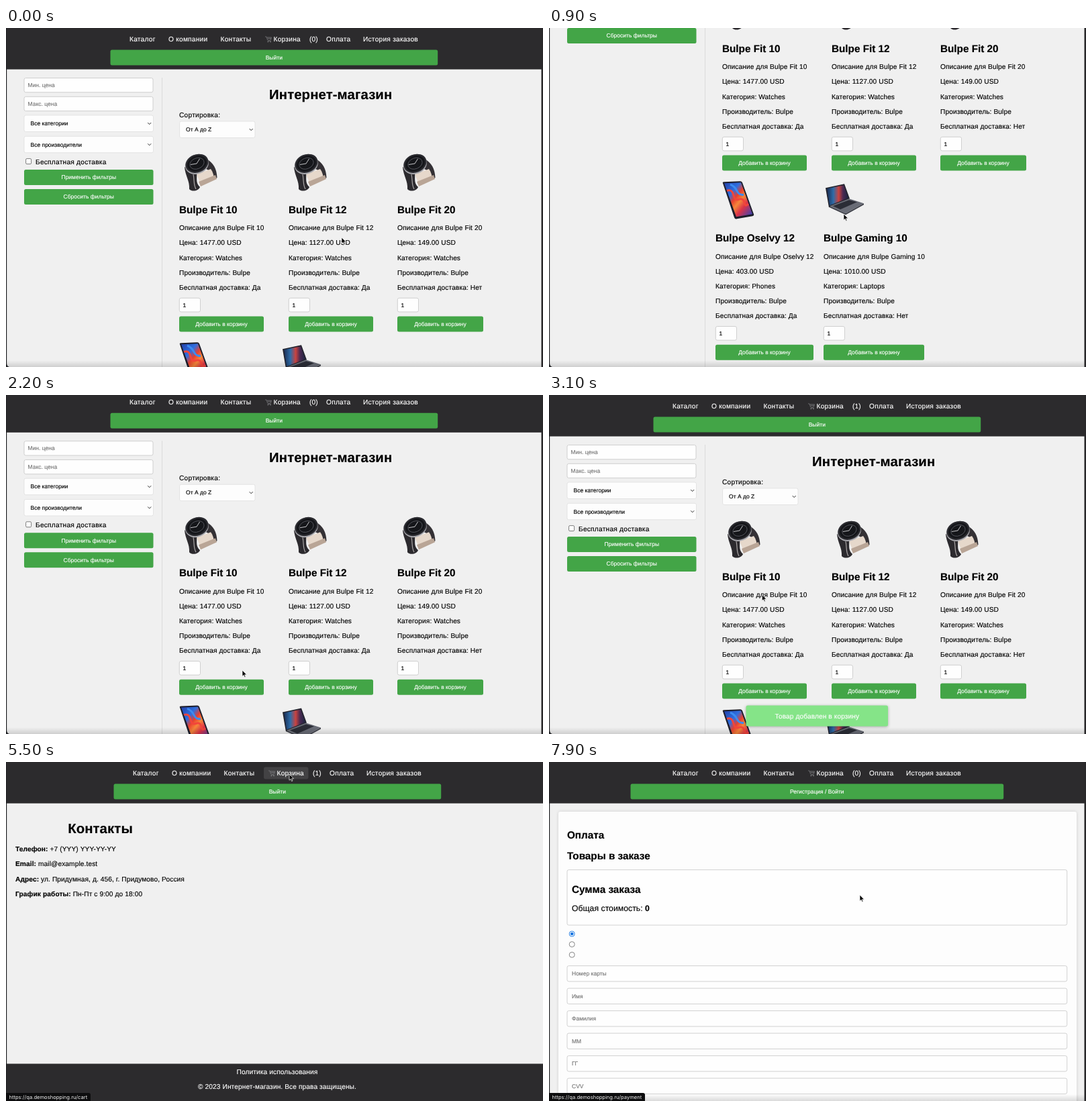
Write an HTML page that moves like this. It is 800 px wide and 505 px high and loops after 8 s.

```html
<!DOCTYPE html>
<html lang="ru">
<head>
<meta charset="utf-8">
<title>Интернет-магазин</title>
<style>
  html, body { margin: 0; width: 100%; height: 100%; overflow: hidden; background: #f0f0f0; }
  svg { display: block; width: 100vw; height: 100vh; }
  text {
    font: 10.17px "Liberation Sans", Arial, sans-serif; letter-spacing: .1px; white-space: pre;
    color: #000; fill: currentColor; stroke: currentColor; stroke-width: .15px;
    text-rendering: geometricPrecision;
  }
  .wide { letter-spacing: .24px; }
  .small { font-size: 8.48px; letter-spacing: .02px; }
  .large { font-size: 12.2px; letter-spacing: .04px; }
  .h1 { font-size: 20.35px; font-weight: bold; }
  .h2 { font-size: 15.27px; font-weight: bold; letter-spacing: 0; }
  .bold { font-weight: bold; }
  .mid { text-anchor: middle; }
  .white { color: #fff; }
  .hint { color: #757575; }
  .url { font: 7.6px Inter, Roboto, sans-serif; letter-spacing: 0; color: #f0f0f0; stroke: none; }
  .bar { fill: #2c2b2d; }
  .green { fill: #43a547; }
  .field { fill: #fefefe; stroke: #c6c6c6; stroke-width: .8; }
  .check { fill: #fff; stroke: #6f6f6f; stroke-width: .9; }
  .select { fill: #fdfdfd; stroke: #dcdcdc; stroke-width: .7; }
  .tick { fill: none; stroke: #333; stroke-width: 1; }
  #toast rect { fill: #85e488; filter: drop-shadow(0 1px 2px rgba(0, 0, 0, .3)); }
</style>
</head>
<body>
<svg id="stage" viewBox="0 0 800 505" preserveAspectRatio="none">
  <defs>
    <linearGradient id="screen" x1="0" y1="0" x2="1" y2="1">
      <stop offset="0" stop-color="#2340a8"/>
      <stop offset=".28" stop-color="#2f6fe0"/>
      <stop offset=".42" stop-color="#e8402f"/>
      <stop offset=".55" stop-color="#f5873a"/>
      <stop offset=".7" stop-color="#dc3348"/>
      <stop offset="1" stop-color="#2446c4"/>
    </linearGradient>
    <linearGradient id="panel">
      <stop offset="0" stop-color="#1b2c52"/>
      <stop offset=".3" stop-color="#2d6ca8"/>
      <stop offset=".55" stop-color="#c9433f"/>
      <stop offset=".75" stop-color="#4a2a52"/>
      <stop offset="1" stop-color="#1c2440"/>
    </linearGradient>
    <linearGradient id="shade" x2="0" y2="1">
      <stop offset="0" stop-opacity="0"/>
      <stop offset="1" stop-opacity=".14"/>
    </linearGradient>
    <g id="watch">
      <path d="M40 9C51 14 56 24 56.5 37L49 41C49 32 46 26 40 24Z" fill="#343135"/>
      <path d="M26 32L47 24C50 28 52 34 52 40L33 49Z" fill="#e6d8cb"/>
      <path d="M29 43L54 33L56 39L32 50Z" fill="#b9a596"/>
      <path d="M8 21L26 30C27 38 24 44 31 51C29 56 20 59 15 54C16 42 9 34 8 21Z" fill="#2c2a2e"/>
      <path d="M21 32C23 42 21 47 25 54" fill="none" stroke="#aaa6a6" stroke-width="1.2"/>
      <g transform="rotate(-22 26 16)">
        <ellipse cx="26" cy="17" rx="18" ry="14.5" fill="#a9a9ae"/>
        <ellipse cx="26.5" cy="16" rx="17.5" ry="13.5" fill="#2b2b30"/>
        <ellipse cx="26.5" cy="16" rx="15" ry="11.3" fill="#15161a"/>
        <ellipse cx="26.5" cy="16" rx="11" ry="8" fill="none" stroke="#62646b" stroke-width=".7"/>
        <path d="M26 16L17 14M26 16L33 11" stroke="#d8d8dc" stroke-width=".8"/>
      </g>
    </g>
    <g id="phone">
      <path d="M11 3Q10 1 13 1L37 0Q39 0 40 2L57 49Q58 51 55 52L32 56Q29 57 28 54Z" fill="#1d1e2b"/>
      <path d="M13 3L38 2L55 49L31 53Z" fill="url(#screen)"/>
      <path d="M17 14C31 10 23 31 35 27S40 42 49 34" fill="none" stroke="#f2453a" stroke-width="3"/>
      <path d="M22 5C34 8 30 22 42 20" fill="none" stroke="#3c8cf0" stroke-width="3"/>
    </g>
    <g id="laptop">
      <path d="M3 10L31 4L39 26L8 39Z" fill="#22232c"/>
      <path d="M5 11L30 6L37 25L9 36Z" fill="url(#panel)"/>
      <path d="M9 37L38 26L60 33L33 48Z" fill="#696c76"/>
      <path d="M14 37L38 28L50 31L25 42Z" fill="#2b2d36"/>
      <path d="M9 37L33 48L60 33V35L33 50L9 39Z" fill="#3a3c45"/>
    </g>
  </defs>
  <rect width="800" height="505" fill="#f0f0f0"/>
  <g id="catalog"></g>
  <g id="about"></g>
  <g id="contacts"></g>
  <g id="cart"></g>
  <g id="payment"></g>
  <g id="footer"></g>
  <g id="header"></g>
  <g id="toast"></g>
  <rect id="edge" x="797.5" width="3" height="505" fill="#29282a"/>
  <rect id="glow" y="495" width="798" height="10" fill="url(#shade)"/>
  <path d="M0 0H1.2V500Q1.5 504 5 505H0Z" fill="#232427"/>
  <g id="status"></g>
  <path id="cursor" d="M0 0V9.2L2.1 7.3L3.6 10.6L5 10L3.6 6.8H6.5Z" stroke="#fff" stroke-width=".7"/>
</svg>
<script>
const $ = id => document.getElementById(id);
const text = (x, y, s, cls = '') => `<text x="${x}" y="${y}" class="${cls}">${s}</text>`;
const box = (x, y, w, h, cls, r = 2.5) =>
  `<rect x="${x}" y="${y}" width="${w}" height="${h}" rx="${r}" class="${cls}"/>`;
const button = (x, y, w, s) =>
  box(x, y, w, 23, 'green') + text(x + w / 2, y + 14.4, s, 'small white mid');
const input = (x, y, w, h, s) =>
  box(x, y, w, h, 'field') + text(x + (w > 300 ? 7 : 5.5), y + h / 2 + 3, s, 'small hint');
const select = (x, y, w, s) =>
  box(x, y, w, 24.5, 'select') + text(x + 9.5, y + 15.2, s, 'small') +
  `<path class="tick" d="M${x + w - 8.3} ${y + 11}l2.5 2.6l2.5 -2.6"/>`;
const panel = (w, h) => `<rect x="14" y="74" width="${w}" height="${h}" rx="3" fill="#fdfdfd" ` +
  'style="filter:drop-shadow(0 0 2px rgba(0,0,0,.14))"/>';

const card = ([x, dy, w, art, name, price, kind, free]) => {
  const rows = [`Описание для ${name}`, `Цена: ${price}.00 USD`, `Категория: ${kind}`,
    'Производитель: Bulpe', `Бесплатная доставка: ${free}`];
  return `<g transform="translate(${x} ${dy})"><use href="#${art}" y="186"/>` +
    text(0, 276, name, 'h2') +
    rows.map((s, i) => text(0, 301.4 + i * 22.05, s)).join('') +
    box(.3, 402.3, 31.2, 20.6, 'field') + text(5.5, 415.7, '1', 'small') +
    button(0, 429.5, w, 'Добавить в корзину') + '</g>';
};

const cards = [
  [258, 0, 126, 'watch', 'Bulpe Fit 10', 1477, 'Watches', 'Да'],
  [421, 0, 126, 'watch', 'Bulpe Fit 12', 1127, 'Watches', 'Да'],
  [583, 0, 128, 'watch', 'Bulpe Fit 20', 149, 'Watches', 'Нет'],
  [248, 282.2, 146, 'phone', 'Bulpe Oselvy 12', 403, 'Phones', 'Да'],
  [409, 282.2, 150, 'laptop', 'Bulpe Gaming 10', 1010, 'Laptops', 'Нет']
];

$('catalog').innerHTML =
  input(27, 74.5, 192, 21.3, 'Мин. цена') + input(27, 102.3, 192, 21.3, 'Макс. цена') +
  select(27, 130, 192.5, 'Все категории') + select(27, 161.3, 192.5, 'Все производители') +
  box(29.6, 194.6, 8, 8, 'check', 1.5) + text(44, 202.7, 'Бесплатная доставка', 'wide') +
  button(27, 211, 192.5, 'Применить фильтры') + button(27, 240, 192.5, 'Сбросить фильтры') +
  '<path d="M232.5 74V746" stroke="#d6d6d6" stroke-width=".8"/>' +
  text(483.7, 106, 'Интернет-магазин', 'h1 mid') + text(258, 133, 'Сортировка:', 'wide') +
  select(258.6, 139, 112.4, 'От А до Z') + cards.map(card).join('');

$('about').innerHTML = text(404, 106, 'О компании', 'h1 mid');

const facts = [
  ['Телефон', '+7 (YYY) YYY-YY-YY'],
  ['Email', 'mail@example.test'],
  ['Адрес', 'ул. Придумная, д. 456, г. Придумово, Россия'],
  ['График работы', 'Пн-Пт с 9:00 до 18:00']
];
$('contacts').innerHTML = text(140.5, 106, 'Контакты', 'h1 mid') +
  facts.map(([k, v], i) =>
    text(14, 133.3 + i * 22.1, `<tspan class="bold">${k}:</tspan> ${v}`)).join('');

$('cart').innerHTML = panel(780, 320) + text(27, 114, 'Корзина', 'h2');

const radio = (y, on) => `<circle cx="34.2" cy="${y}" r="4" fill="#fff" stroke="${on ? '#1273e0' : '#777'}" ` +
  `stroke-width=".9"/>${on ? `<circle cx="34.2" cy="${y}" r="2.3" fill="#1273e0"/>` : ''}`;
$('payment').innerHTML = panel(772, 440) +
  text(27, 114, 'Оплата', 'h2') + text(27, 144.5, 'Товары в заказе', 'h2') +
  box(27, 160.6, 744.7, 82.4, 'field') + text(34, 194.5, 'Сумма заказа', 'h2') +
  text(34, 221.7, 'Общая стоимость: <tspan class="bold">0</tspan>', 'large') +
  radio(256, true) + radio(271.6) + radio(287.2) +
  ['Номер карты', 'Имя', 'Фамилия', 'ММ', 'ГГ', 'CVV']
    .map((s, i) => input(27, 303.6 + i * 33.5, 744.7, 23.3, s)).join('');

$('footer').innerHTML = '<rect y="449.5" width="800" height="56" class="bar"/>' +
  text(404, 465, 'Политика использования', 'white mid') +
  text(404, 487.3, '© 2023 Интернет-магазин. Все права защищены.', 'white mid');

const nav = [[184, 'Каталог'], [242, 'О компании'], [319.5, 'Контакты'],
  [398.5, 'Корзина'], [477, 'Оплата'], [532, 'История заказов']];
// Left edge and width of each hover plate
const plates = [[178, 51], [236, 71], [313.5, 59], [379, 66.5], [471, 48], [526, 95]];
$('header').innerHTML = '<rect x="-10" width="830" height="61.6" class="bar"/>' +
  '<rect id="plate" y="7.5" height="18" rx="3" fill="#434244"/>' +
  nav.map(([x, s]) => text(x, 20, s, 'white wide')).join('') +
  '<path d="M386 13h2l1.6 5h4.6l1.3-4h-7M389.5 15.5h5.5M390 19.3h4.6" fill="none" stroke="#77767a" stroke-width=".8"/>' +
  '<circle cx="390.3" cy="20.6" r=".8" fill="#8a898c"/><circle cx="394" cy="20.6" r=".8" fill="#8a898c"/>' +
  text(452, 20, '', 'white') +
  '<rect id="login" y="32.5" height="23" rx="2.5" class="green"/>' + text(399.3, 46.7, '', 'small white mid');
const [count, loginText] = [...$('header').querySelectorAll('text')].slice(-2);

$('toast').innerHTML = box(293.5, 462.5, 211.5, 31, '') +
  text(399.3, 481.7, 'Товар добавлен в корзину', 'white mid');
$('status').innerHTML = '<path fill="#0d0d0e"/>' + text(4.5, 502.2, '', 'url');
const [bubble, link] = $('status').children;

const scrollPath = [[0, 0], [200, 0], [300, 40], [500, 131.5], [700, 206], [900, 240], [1100, 246.5],
  [1500, 246.5], [1600, 222], [1800, 112], [1900, 64], [2000, 32], [2100, 15], [2200, 5.8], [2400, 0]];
const cursorPath = [[0, 500, 312], [300, 439, 277], [1800, 439, 277], [2200, 352, 410],
  [2400, 334, 437], [2900, 334, 437], [3500, 284, 18], [3900, 279, 14], [4500, 279, 14],
  [4800, 346, 16], [5000, 346, 16], [5300, 422, 18], [5900, 422, 18], [6400, 430, 190],
  [6900, 430, 190], [7300, 500, 16], [7600, 500, 16], [7900, 463, 198]];
const pages = [[0, 'catalog'], [4300, 'about'], [5000, 'contacts'], [5800, 'cart'], [7600, 'payment']];
const links = [[5400, 5900, 'cart', 126], [7400, 8000, 'payment', 143]];

const LOOP = 8000, TICK = 100, ADDED = 2700;

function along(path, t) {
  const i = path.findIndex(p => p[0] > t);
  if (i < 0) return path.at(-1).slice(1);
  const a = path[i - 1], b = path[i], k = (t - a[0]) / (b[0] - a[0]);
  return a.slice(1).map((v, j) => v + (b[j + 1] - v) * k);
}
const show = (id, on) => $(id).style.display = on ? '' : 'none';
const put = (el, s) => { if (el.textContent !== s) el.textContent = s; };

function draw(t) {
  const page = pages.findLast(p => p[0] <= t)[1];
  const [scroll] = along(scrollPath, t), [x, y] = along(cursorPath, t);
  const paying = page === 'payment', short = !paying && page !== 'catalog';
  const dx = short ? 5 : 0;

  for (const [, id] of pages) show(id, id === page);
  show('footer', short);
  show('edge', !short);
  show('glow', !short);
  $('catalog').setAttribute('transform', `translate(0 ${-scroll})`);
  $('header').setAttribute('transform', `translate(${dx} ${-scroll})`);
  $('cursor').setAttribute('transform', `translate(${x} ${y})`);

  put(count, t >= ADDED && !paying ? '(1)' : '(0)');
  put(loginText, paying ? 'Регистрация / Войти' : 'Выйти');
  $('login').setAttribute('x', paying ? 121.5 : 155.5);
  $('login').setAttribute('width', paying ? 555.7 : 487.7);

  const plate = y > 7 && y < 26 && scroll < 8 && plates.find(([l, w]) => x - dx > l && x - dx < l + w);
  show('plate', plate);
  if (plate) {
    $('plate').setAttribute('x', plate[0]);
    $('plate').setAttribute('width', plate[1]);
  }

  show('toast', page === 'catalog' && t >= ADDED);
  $('toast').style.opacity = Math.min(1, Math.max(0, (t - ADDED + 100) / 300));

  const hint = links.find(([a, b]) => t >= a && t < b);
  show('status', hint);
  if (hint) {
    bubble.setAttribute('d', `M0 493H${hint[3] - 3}q3 0 3 3V505H0Z`);
    put(link, `https://qa.demoshopping.ru/${hint[2]}`);
  }
}

const start = performance.now();
function frame() {
  const t = (performance.now() - start) % LOOP;
  draw(Math.floor(t / TICK) * TICK);
  requestAnimationFrame(frame);
}
frame();
</script>
</body>
</html>
```
